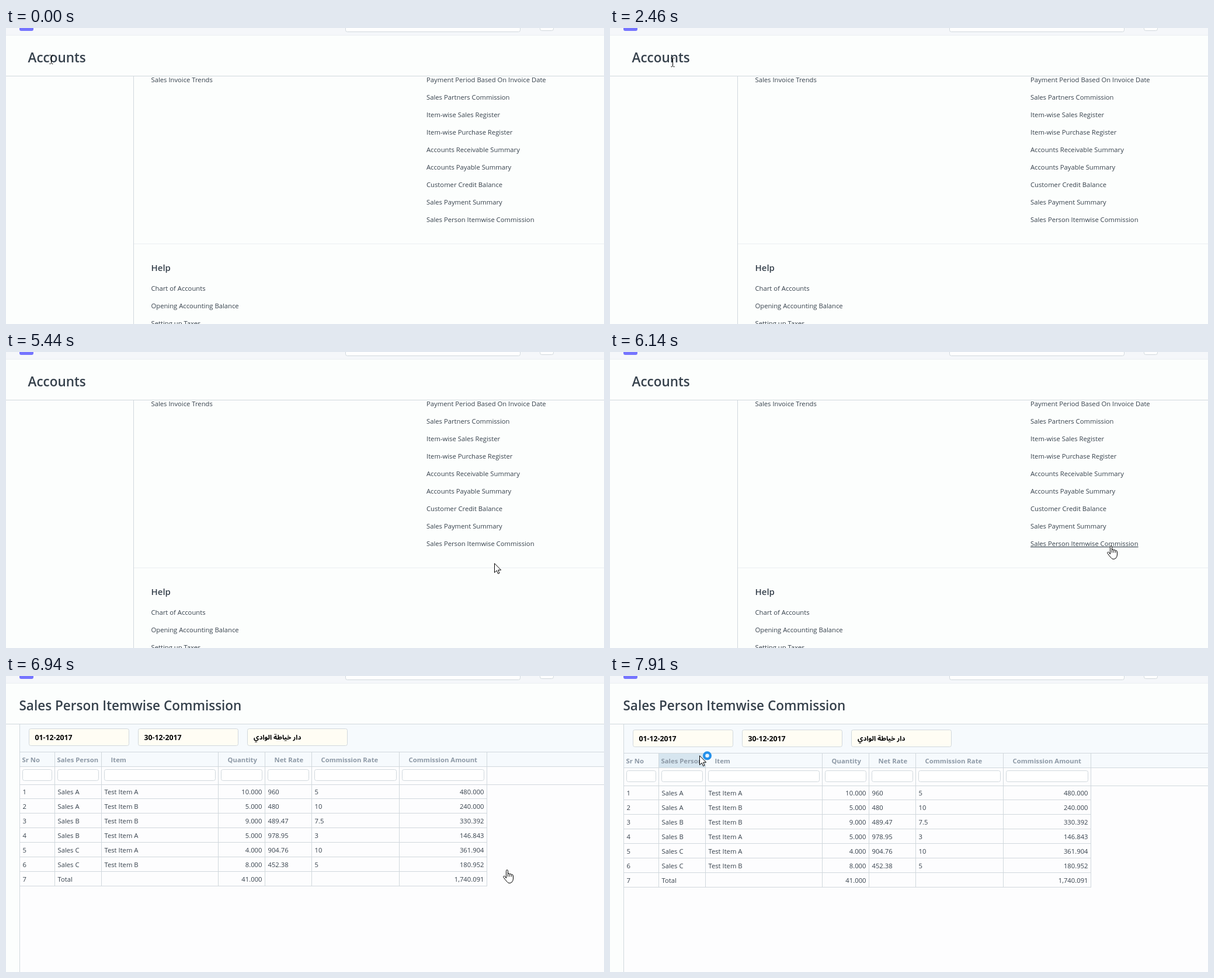
An HTML page for the animation above (8000 ms loop, 1024x508 px).

```html
<!DOCTYPE html>
<html lang="en">
<head>
<meta charset="utf-8">
<title>Commission report</title>
<style>
  html, body { margin: 0; width: 100%; height: 100%; overflow: hidden; background: #fcfefd; }
  svg { display: block; width: 100%; height: 100%; }
  text { font: 11.25px "Open Sans", "Noto Sans", sans-serif; fill: #36414c; white-space: pre; }
  .title { font-size: 22.5px; font-weight: 600; }
  .section { font-size: 15px; font-weight: 600; }
  .head { font-size: 11.3px; font-weight: 700; fill: #8d99a6; }
  .value { font-size: 12.3px; font-weight: 700; fill: #000; }
  .arabic { font: 700 11.5px "Noto Sans Arabic", "DejaVu Sans", sans-serif; fill: #000; }
  .hint { font-size: 11.55px; fill: #8d9499; }
  .end { text-anchor: end; }
  .hover { text-decoration: underline; }
</style>
</head>
<body>
<svg id="stage" viewBox="0 0 1024 508"></svg>
<script>
const LOOP = 8000;
const LINE = '#d1d8dd', PALE = '#ebeff2', TINT = '#f6fafd', HOVER = '#d6e5ef';
const stage = document.getElementById('stage');

function add(parent, tag, attrs = {}, content) {
  const el = document.createElementNS('http://www.w3.org/2000/svg', tag);
  for (const key in attrs) el.setAttribute(key, attrs[key]);
  if (content !== undefined) el.textContent = content;
  parent.append(el);
  return el;
}
const group = parent => add(parent, 'g');
const rect = (parent, x, y, width, height, fill, extra) =>
  add(parent, 'rect', { x, y, width, height, fill, ...extra });
const box = (parent, x, y, w, h, fill) =>
  rect(parent, x + .5, y + .5, w, h, fill, { rx: 3, stroke: LINE });
const label = (parent, x, y, content, cls = '') =>
  add(parent, 'text', { x, y, class: cls }, content);
const show = (el, on) => el.setAttribute('visibility', on ? 'visible' : 'hidden');
const move = (el, x, y) => el.setAttribute('transform', `translate(${x} ${y})`);

// Module page
const modulePage = group(stage);
rect(modulePage, 218, 83, 1, 425, LINE);
rect(modulePage, 219, 370, 805, 1, PALE);
label(modulePage, 248.5, 93, 'Sales Invoice Trends');
let link;
['Payment Period Based On Invoice Date', 'Sales Partners Commission', 'Item-wise Sales Register',
 'Item-wise Purchase Register', 'Accounts Receivable Summary', 'Accounts Payable Summary',
 'Customer Credit Balance', 'Sales Payment Summary', 'Sales Person Itemwise Commission']
  .forEach((name, i) => link = label(modulePage, 720, 93 + 30 * i, name));
label(modulePage, 248.5, 417, 'Help', 'section');
['Chart of Accounts', 'Opening Accounting Balance', 'Setting up Taxes']
  .forEach((name, i) => label(modulePage, 248.5, 451 + 30 * i, name));

// Report page
const reportPage = group(stage);
rect(reportPage, 24, 83, 1000, 425, '#fdfdfe');
const report = group(reportPage);
rect(report, 24, 70, 1000, 85, TINT);
rect(reportPage, 23, 83, 1, 425, LINE);

const edges = [23, 83, 163, 363, 443, 523, 673, 823];
const heads = [
  ['Sr No', 27.5], ['Sales Person', 87.5], ['Item', 179.5], ['Quantity', 379.5],
  ['Net Rate', 459.5], ['Commission Rate', 539.5], ['Commission Amount', 689.5]];
const rows = [
  'Sales A|Test Item A|10.000|960|5|480.000',
  'Sales A|Test Item B|5.000|480|10|240.000',
  'Sales B|Test Item B|9.000|489.47|7.5|330.392',
  'Sales B|Test Item A|5.000|978.95|3|146.843',
  'Sales C|Test Item A|4.000|904.76|10|361.904',
  'Sales C|Test Item B|8.000|452.38|5|180.952',
  'Total||41.000|||1,740.091'];

const headFills = heads.map(([name, x], i) => {
  const left = edges[i], width = edges[i + 1] - left;
  const fill = rect(report, left + 1, 131, width - 1, 24, HOVER);
  label(report, x, 148, name, 'head');
  box(report, left + 5, 160, width - 10, 19, '#fff');
  return fill;
});
for (const y of [130, 155, 186]) rect(report, 24, y, 1000, 1, LINE);
for (const x of edges) rect(report, x, 130, 1, 231, LINE);
rows.forEach((row, r) => {
  const y = 203 + 25 * r;
  [r + 1, ...row.split('|')].forEach((cell, i) => {
    const right = i === 3 || i === 6;
    label(report, right ? edges[i + 1] - 4.5 : edges[i] + 5.5, y, cell, right ? 'end' : '');
  });
  rect(report, 23, y + 7, 801, 1, LINE);
});
for (const x of [39, 226, 413]) box(report, x, 90, 171, 29, '#fffdf4');
label(report, 49.5, 110, '01-12-2017', 'value');
label(report, 236.5, 110, '30-12-2017', 'value');
label(report, 424, 109, 'دار خياطة الوادي', 'arabic');
label(report, 384, 630, 'For comparative filters, start with ">" or "<" or "!", e.g. >5 or >01-02-2012 or !0', 'hint');

// Fixed header
const header = group(stage);
rect(header, 0, 0, 1024, 82, '#fcfefd');
rect(header, 0, 0, 1024, 12, '#f5f7fa');
rect(header, 0, 12, 1024, 1, PALE);
rect(header, 0, 82, 1024, 1, LINE);
rect(header, 23, -19, 24, 24, '#7574ff', { rx: 3 });
box(header, 581, -20, 299, 26, '#fff');
box(header, 914, -20, 23, 24, '#fff');
const titles = [label(header, 37.5, 59, 'Accounts', 'title'),
                label(header, 22.5, 59, 'Sales Person Itemwise Commission', 'title')];

// Cursors
const ARROW = 'M.5 .8V16.6L4.2 13.1 6.6 18.5 9 17.5 6.7 12.2H11.6Z';
const HAND = 'M5.5 15V2.5Q5.5 .8 7 .8T8.5 2.5V8.5Q8.7 6.8 10.1 6.8T11.7 8.6Q12 7.5 13.2 7.6' +
  'T14.8 9.4Q15.2 8.6 16.2 8.8T17.5 10.8V16Q17.5 19.5 15 22Q13.5 23.4 11 23.4T7.4 21.6' +
  'Q3 17 1 13.4Q.3 11.8 1.6 11.3T4 12.6ZM8.5 8.5V12.5M11.7 8.8V12.5M14.8 9.6V12.5';
const BEAM = 'M-3 -7.5H-1M1 -7.5H3M0 -7V7M-3 7.5H-1M1 7.5H3';
function cursor(d, fill = '#fff') {
  const g = group(stage);
  add(g, 'path', { d, fill, stroke: '#000', 'stroke-linejoin': 'round' });
  return g;
}
const cursors = { beam: cursor(BEAM, 'none'), arrow: cursor(ARROW), hand: cursor(HAND), busy: cursor(ARROW) };
add(cursors.busy, 'circle', { cx: 13.5, cy: .7, r: 5.4, fill: '#e8f4fd', stroke: '#2490ea', 'stroke-width': 4.2 });

// [time, cursor, x, y]
const path = [
  [0, 'beam', 77, 54], [1350, 'beam', 66, 55], [1630, 'beam', 79, 58], [1770, 'beam', 123, 58],
  [1920, 'beam', 100, 61], [2040, 'arrow', 66, 69], [2190, 'beam', 120, 59], [2310, 'beam', 109, 59],
  [2460, 'beam', 107, 59], [2880, 'beam', 116, 59], [3010, 'beam', 122, 59],
  [3520, 'arrow', 387, 196], [3670, 'arrow', 574, 361], [3800, 'arrow', 550, 340],
  [4070, 'arrow', 720, 350], [4200, 'arrow', 760, 372], [4350, 'arrow', 794, 352],
  [4480, 'arrow', 786, 337], [4630, 'hand', 780, 331], [4790, 'hand', 781, 330],
  [5440, 'arrow', 836, 362], [5580, 'arrow', 858, 369], [5710, 'arrow', 857, 350],
  [5860, 'hand', 851, 335], [5990, 'hand', 851, 334], [6140, 'hand', 851, 332],
  [7090, 'busy', 858, 334], [7370, 'busy', 649, 334], [7520, 'busy', 500, 284],
  [7640, 'busy', 340, 212], [7770, 'busy', 230, 152], [7910, 'busy', 153, 136]];
// [time, report offset]
const scroll = [[0, -123], [6810, -40], [6940, 0], [7090, 2]];

const at = (steps, t) => steps.filter(step => step[0] <= t).pop();

function draw() {
  const t = performance.now() % LOOP;
  const onReport = t >= 6660;
  const [, kind, x, y] = at(path, t);
  show(modulePage, !onReport);
  show(reportPage, onReport);
  titles.forEach((el, i) => show(el, onReport === (i === 1)));
  move(report, 0, at(scroll, t)[1]);
  link.setAttribute('class', kind === 'hand' ? 'hover' : '');
  const over = t >= 7910 ? 1 : t >= 7770 ? 2 : -1;
  headFills.forEach((el, i) => el.setAttribute('fill', i === over ? HOVER : TINT));
  for (const name in cursors) show(cursors[name], name === kind);
  move(cursors[kind], kind === 'beam' ? x + .5 : x, y);
  requestAnimationFrame(draw);
}
draw();
</script>
</body>
</html>
```
